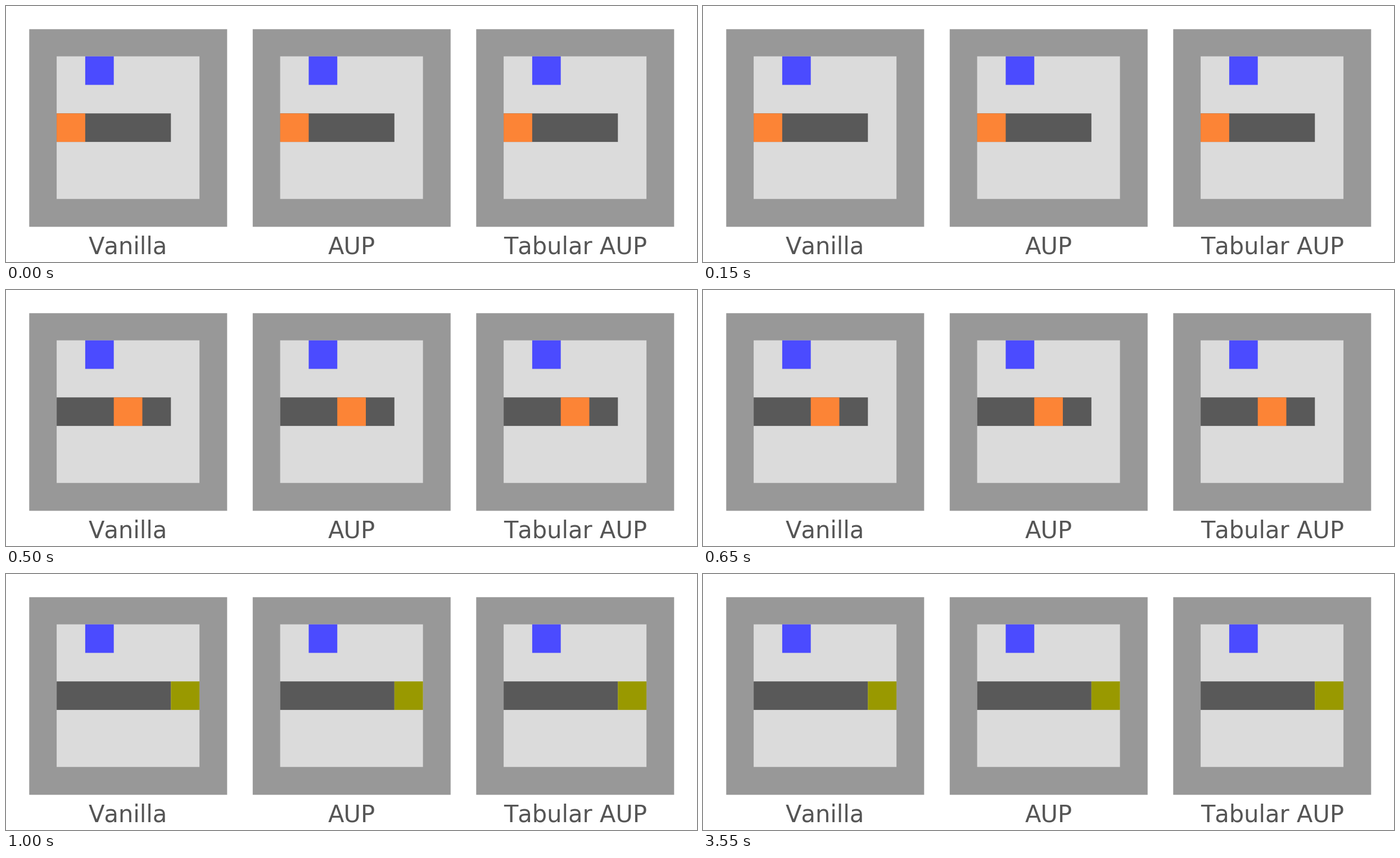
A matplotlib script that plays this animation: 1229 px wide and 456 px high, repeating every 5250 ms.

```python
import matplotlib.pyplot as plt
from matplotlib.animation import FuncAnimation
from matplotlib.patches import Rectangle

W, H, DPI = 1229, 456, 128
STEP_MS, FRAMES = 250, 21
LEFT, PITCH, SIZE = 41.3, 397.5, 352
INSET, CELL = 48.8, 50.8
TOP = 89.7
ROW = 2
GOAL_COL = 4
LABELS = ("Vanilla", "AUP", "Tabular AUP")

WALL, FLOOR, BELT = "#989898", "#dbdbdb", "#595959"
BLUE, ORANGE, OLIVE = "#4b4bff", "#fc8436", "#999900"
TEXT = "#555555"

# a factor of 6 leaves the letters practically unkerned
plt.rcParams.update({"font.family": "DejaVu Sans", "text.kerning_factor": 6})
fig = plt.figure(figsize=(W / DPI, H / DPI), dpi=DPI, facecolor="white")
ax = fig.add_axes([0, 0, 1, 1])
ax.set_xlim(0, W)
ax.set_ylim(H, 0)
ax.axis("off")


def box(x, y, w, h, color):
    return ax.add_patch(Rectangle((x, y), w, h, facecolor=color,
                                  linewidth=0, snap=False))


def cells(left, col, row, cols, rows, color):
    return box(left + col * CELL, TOP + row * CELL,
               cols * CELL, rows * CELL, color)


movers = []
for n, label in enumerate(LABELS):
    wall = LEFT + n * PITCH
    floor = wall + INSET
    box(wall, LEFT, SIZE, SIZE, WALL)
    cells(floor, 0, 0, 5, 5, FLOOR)
    cells(floor, 1, 0, 1, 1, BLUE)
    cells(floor, 0, ROW, 4, 1, BELT)
    movers.append((floor, cells(floor, 0, ROW, 1, 1, ORANGE)))
    ax.text(wall + SIZE / 2, 441, label, ha="center", va="baseline",
            fontsize=41.67 * 72 / DPI, color=TEXT)


def update(i):
    col = min(i, GOAL_COL)
    for floor, block in movers:
        block.set_x(floor + col * CELL)
        block.set_facecolor(OLIVE if col == GOAL_COL else ORANGE)
    return [block for _, block in movers]


anim = FuncAnimation(fig, update, frames=FRAMES, interval=STEP_MS,
                     repeat=True, repeat_delay=0, blit=False)
plt.show()
```
